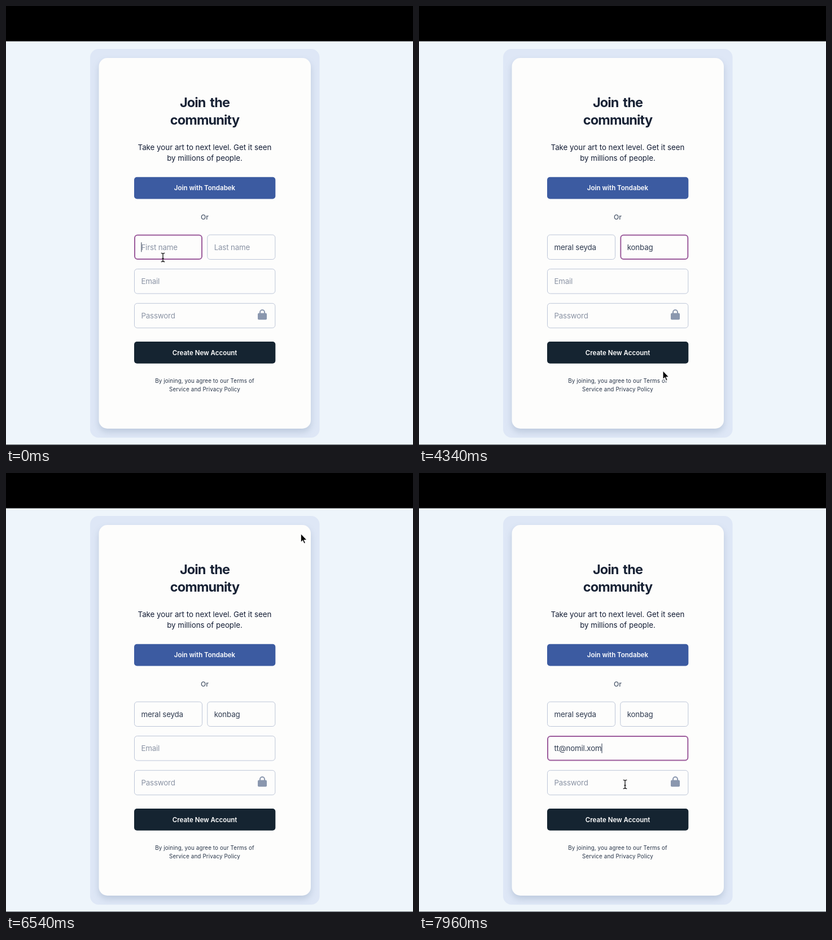
An HTML page that plays this animation: 721x777 px, repeating every 8000 ms.

```html
<!DOCTYPE html>
<html lang="en">
<head>
<meta charset="utf-8">
<title>Join form</title>
<style>
  html, body { margin: 0; height: 100%; overflow: hidden; background: #eef5fb; }
  svg { display: block; width: 100vw; height: 100vh; }
  text { font: 400 13.3px Inter, sans-serif; letter-spacing: -.15px; fill: #2f3b50; white-space: pre; }
  .mid { text-anchor: middle; }
  .title { font-size: 23.5px; font-weight: 700; letter-spacing: -.85px; word-spacing: 3px; fill: #182235; }
  .lead { letter-spacing: 0; fill: #131d35; }
  .button { font-size: 11.5px; font-weight: 600; letter-spacing: 0; fill: #fff; }
  .or { font-size: 12px; font-weight: 500; letter-spacing: 0; fill: #475569; }
  .terms { font-size: 9.8px; letter-spacing: .13px; fill: #29364a; }
  .placeholder { fill: #8a93a4; }
  .card { filter: drop-shadow(0 6px 6px rgba(40, 70, 110, .18)); }
  .dialog { filter: drop-shadow(0 6px 9px rgba(0, 0, 0, .35)); }
  .origin { font-size: 14.2px; letter-spacing: .12px; fill: #e8eaed; }
  .message { font-size: 12.2px; letter-spacing: .14px; fill: #e8eaed; }
  .ok { font-size: 11.5px; font-weight: 600; letter-spacing: 0; fill: #202124; }
</style>
</head>
<body>
<svg viewBox="0 0 721 777" preserveAspectRatio="none">
  <rect width="721" height="777" fill="#eef5fb"/>
  <rect width="721" height="62.5"/>
  <rect y="776" width="721" height="1" fill="#5c6066"/>
  <rect x="149" y="76" width="406.5" height="688" rx="15" fill="#dee7f6"/>
  <rect class="card" x="164.5" y="92" width="375.5" height="656" rx="15" fill="#fdfdfc"/>

  <g class="mid">
    <text class="title" x="352" y="179">Join the</text>
    <text class="title" x="352" y="210">community</text>
    <text class="lead" x="352" y="254.7">Take your art to next level. Get it seen</text>
    <text class="lead" x="352" y="274.2">by millions of people.</text>
    <rect x="227" y="302.7" width="250.3" height="38.8" rx="5" fill="#3c5ba1"/>
    <text class="button" x="352" y="326.3">Join with Tondabek</text>
    <text class="or" x="352" y="377.6">Or</text>
    <rect x="227" y="594" width="250.3" height="38.7" rx="5" fill="#152431"/>
    <text class="button" x="352" y="617.8">Create New Account</text>
    <text class="terms" x="352" y="667.2">By joining, you agree to our Terms of</text>
    <text class="terms" x="352" y="681.8">Service and Privacy Policy</text>
  </g>

  <g id="fields"></g>
  <g fill="#8a97ae">
    <rect x="446" y="543.5" width="16" height="11.8" rx="2"/>
    <path d="M450 545v-3a4 4 0 0 1 8 0v3" fill="none" stroke="#8a97ae" stroke-width="2"/>
  </g>
  <rect id="caret" width="1" height="17" fill="#2f3b50"/>

  <g id="dialog">
    <rect class="dialog" x="132.7" y="-10" width="439" height="132.7" rx="5" fill="#212226"/>
    <text class="origin" x="149" y="26.2">An embedded page at zbqn.ix says</text>
    <text class="message" x="149" y="54.7">Please enter valid values.</text>
    <rect x="493" y="75.3" width="62.6" height="31" rx="3.5" fill="#7ba6f0"/>
    <text class="ok mid" x="524" y="95">OK</text>
  </g>

  <g id="cursor">
    <path id="arrow" d="M0-.7V15L3.5 11.7L5.9 17.2L8.3 16.2L6 10.8H11Z" stroke="#fff" stroke-width="1.1"/>
    <path id="beam" d="M-3.3-7.7Q0-7.7 0-5.7Q0-7.7 3.3-7.7M0-6V6M-3.3 7.7Q0 7.7 0 5.7Q0 7.7 3.3 7.7M-1.7 1.8H1.7" fill="none" stroke="#111" stroke-width="1.3"/>
  </g>
</svg>
<script>
const LOOP = 8000;
const $ = id => document.getElementById(id);
const show = (node, on) => node.setAttribute('visibility', on ? 'inherit' : 'hidden');

function add(tag, attrs) {
  const node = document.createElementNS('http://www.w3.org/2000/svg', tag);
  for (const key in attrs) node.setAttribute(key, attrs[key]);
  return $('fields').appendChild(node);
}

// typed: [time, number of characters] steps, linear between them
const fields = [
  { x: 227, y: 404.5, w: 121, hint: 'First name', value: 'meral seyda', focus: [0, 3090],
    typed: [[30, 0], [240, 6], [1839, 6], [1840, 11]] },
  { x: 356.3, y: 404.5, w: 121, hint: 'Last name', value: 'konbag', focus: [3090, 5110],
    typed: [[3150, 0], [3850, 6]] },
  { x: 227, y: 465, w: 250.3, hint: 'Email', value: 'tt@nomil.xom', focus: [7000, LOOP],
    typed: [[7440, 0], [7920, 12]] },
  { x: 227, y: 525.8, w: 250.3, hint: 'Password', value: '', focus: [0, 0], typed: [[0, 0]] }
];
const FIELD_H = 44.5;
for (const f of fields) {
  f.box = add('rect', { rx: 5, fill: '#fdfdfc' });
  f.text = add('text', { x: f.x + 12.4, y: f.y + 27 });
}

// cursor hotspot: time, x, y
const path = [
  [0, 278, 445], [3910, 278, 445], [4290, 432, 646], [4400, 432, 646], [4720, 403, 615],
  [4860, 402, 614.5], [5180, 402, 614.5], [5890, 522, 107.5], [6500, 522, 107.5], [6640, 523, 109.5],
  [6980, 372, 487], [7060, 372, 487], [7290, 365, 551]
];

const linear = u => u;
const smooth = u => u * u * (3 - 2 * u);

function sample(keys, t, ease) {
  if (t <= keys[0][0]) return keys[0].slice(1);
  const i = keys.findIndex(k => k[0] > t);
  if (i < 0) return keys[keys.length - 1].slice(1);
  const a = keys[i - 1], b = keys[i];
  const u = ease((t - a[0]) / (b[0] - a[0]));
  return a.slice(1).map((v, n) => v + (b[n + 1] - v) * u);
}

function drawField(f, t) {
  const focused = t >= f.focus[0] && t < f.focus[1];
  const count = Math.floor(sample(f.typed, t, linear)[0]);
  const line = focused ? 2 : 1;
  const attrs = {
    x: f.x + line / 2, y: f.y + line / 2, width: f.w - line, height: FIELD_H - line,
    stroke: focused ? '#9c5c9c' : '#bdc6d8', 'stroke-width': line
  };
  for (const key in attrs) f.box.setAttribute(key, attrs[key]);
  f.text.textContent = count ? f.value.slice(0, count) : f.hint;
  f.text.setAttribute('class', count ? '' : 'placeholder');
  if (focused) {
    const offset = count ? f.text.getComputedTextLength() : 0;
    $('caret').setAttribute('x', f.x + 12.4 + offset);
    $('caret').setAttribute('y', f.y + 13.8);
  }
  return focused;
}

function drawCursor(t) {
  const [x, y] = sample(path, t, smooth);
  const overField = fields.some(f => x > f.x && x < f.x + f.w && y > f.y && y < f.y + FIELD_H);
  $('cursor').setAttribute('transform', `translate(${x} ${y})`);
  show($('cursor'), t < 70 || t >= 3910);
  show($('beam'), overField);
  show($('arrow'), !overField);
}

function frame(now) {
  const t = now % LOOP;
  const anyFocus = fields.map(f => drawField(f, t)).some(Boolean);
  show($('caret'), anyFocus && (t < 4200 || t > 7000));
  show($('dialog'), t >= 5110 && t < 6400);
  drawCursor(t);
  requestAnimationFrame(frame);
}
requestAnimationFrame(frame);
</script>
</body>
</html>
```
